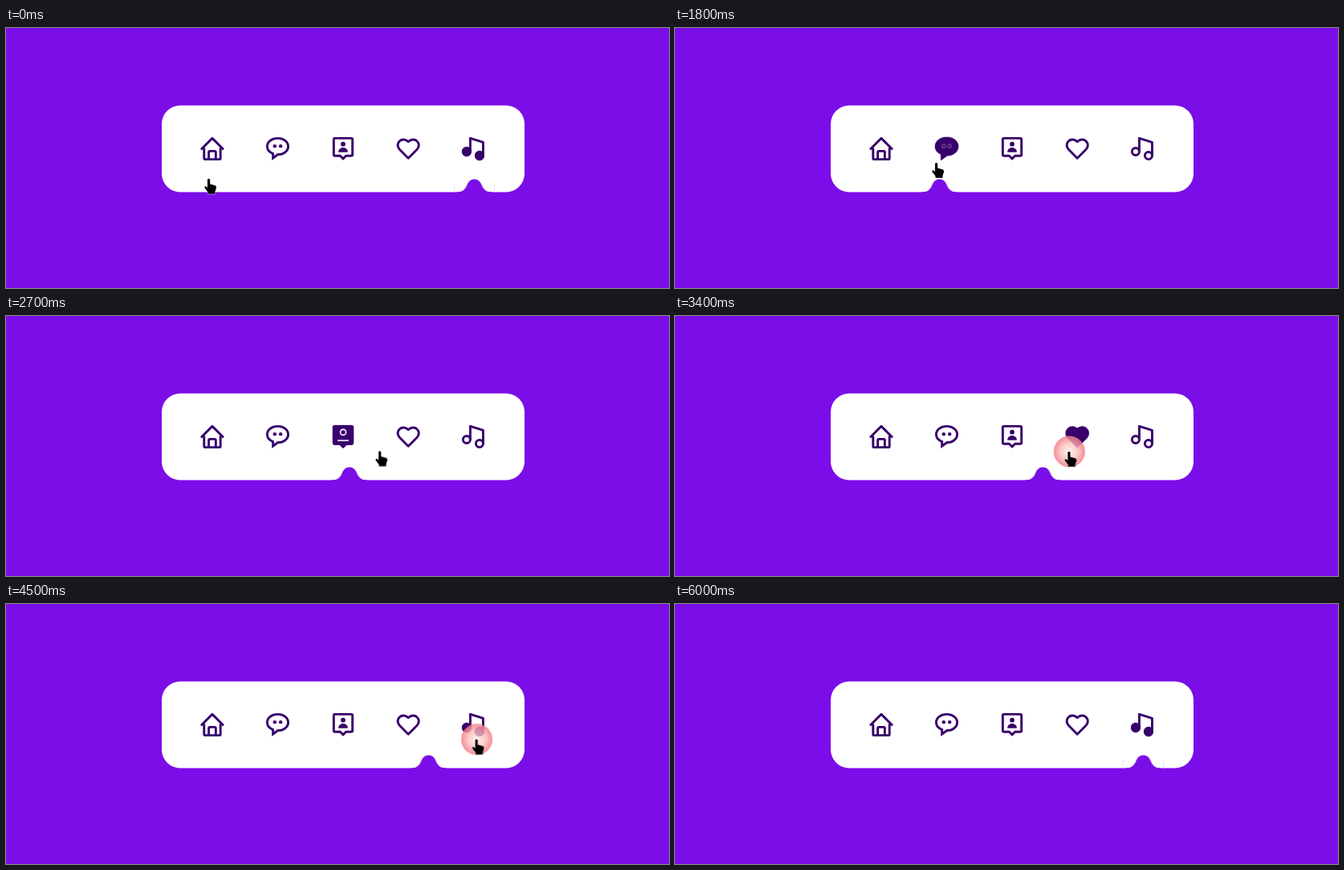
These frames come from a looping animation (826x324 px, 6100 ms). An HTML page without scripts:

```html
<!DOCTYPE html>
<html lang="en">
<head>
<meta charset="utf-8">
<title>Tab bar</title>
<style>
  :root { --bg: #7b0de8; --ink: #38006b; --loop: 6100ms; }
  html, body { margin: 0; width: 100%; height: 100%; overflow: hidden; background: var(--bg); }
  svg { display: block; width: 826px; height: 324px; }

  .icon { fill: none; stroke: var(--ink); stroke-width: 2; stroke-linecap: round; stroke-linejoin: round; }
  .sharp { stroke-linejoin: miter; }
  .solid { fill: var(--ink); }
  .dot { fill: var(--ink); stroke: none; }
  .cut { fill: #fff; stroke: none; }
  .line { fill: none; stroke: #fff; stroke-linecap: butt; }

  .on { opacity: 0; animation: var(--loop) step-end infinite; }
  .home { animation-name: home; }
  .chat { animation-name: chat; }
  .user { animation-name: user; }
  .heart { animation-name: heart; }
  .music { animation-name: music; }
  @keyframes home { 0%, 25.77% { opacity: 0 } 8.393% { opacity: 1 } }
  @keyframes chat { 0%, 38.934% { opacity: 0 } 25.77% { opacity: 1 } }
  @keyframes user { 0%, 52.656% { opacity: 0 } 38.934% { opacity: 1 } }
  @keyframes heart { 0%, 70.902% { opacity: 0 } 52.656% { opacity: 1 } }
  @keyframes music { 0%, 70.902% { opacity: 1 } 8.393% { opacity: 0 } }

  .notch { fill: var(--bg); animation: slide var(--loop) cubic-bezier(.68, -.55, .265, 1.55) infinite; }
  @keyframes slide {
    0%, 8.393% { transform: translateX(583.5px) }
    14.951%, 25.77% { transform: translateX(257.5px) }
    32.328%, 38.934% { transform: translateX(339px) }
    45.492%, 52.656% { transform: translateX(420.5px) }
    59.213%, 70.902% { transform: translateX(502px) }
    77.459%, 100% { transform: translateX(583.5px) }
  }

  .seams { stroke: #e9e6ee; animation: seams var(--loop) step-end infinite; }
  @keyframes seams { 0%, 80.33% { opacity: 1 } 8.197% { opacity: 0 } }

  .cursor { animation: move var(--loop) linear infinite; }
  @keyframes move {
    0% { transform: translate(253px, 188px) }
    3.279%, 14.754% { transform: translate(249px, 173px) }
    16.393% { transform: translate(268px, 171px) }
    18.033% { transform: translate(299px, 169px) }
    19.672% { transform: translate(318px, 168px) }
    21.311%, 31.148% { transform: translate(326px, 168px) }
    32.787% { transform: translate(365px, 168px) }
    34.426%, 40.984% { transform: translate(404px, 168px) }
    44.262% { transform: translate(466px, 168.5px) }
    47.541% { transform: translate(488px, 169px) }
    49.18%, 55.738% { transform: translate(491px, 169px) }
    60.656% { transform: translate(583.5px, 168px) }
    62.295%, 65.574% { transform: translate(585px, 168px) }
    67.213%, 73.77% { transform: translate(586.5px, 168.5px) }
    75.41% { transform: translate(588px, 190px) }
    78.689% { transform: translate(598px, 302px) }
    80.328%, 100% { transform: translate(600px, 350px) }
  }

  .press { opacity: 0; animation: press var(--loop) step-end infinite; }
  @keyframes press {
    0%, 11.67%, 29.05%, 42.21%, 55.93%, 74.18% { opacity: 0 }
    8.07%, 25.44%, 38.61%, 52.33%, 70.57% { opacity: 1 }
  }
  .hand { stroke: #fff; stroke-width: .8; paint-order: stroke; }
</style>
</head>
<body>
<svg viewBox="0 0 826 324">
  <defs>
    <radialGradient id="glow">
      <stop offset="0" stop-color="#fff0ea" stop-opacity=".75"/>
      <stop offset=".5" stop-color="#fbc0bd" stop-opacity=".78"/>
      <stop offset="1" stop-color="#f27884" stop-opacity=".85"/>
    </radialGradient>
    <path id="bubble" d="M12 3C7 3 3 6 3 10c0 2.6 1.8 4.9 5 6.2V20l4-3c5 0 9-3 9-7s-4-7-9-7z"/>
    <path id="pin" d="M5 3h14a1 1 0 0 1 1 1v13a1 1 0 0 1-1 1h-4.5L12 20.5 9.5 18H5a1 1 0 0 1-1-1V4a1 1 0 0 1 1-1z"/>
    <path id="love" d="M12 20L4.5 12.5C2.5 10.5 2.5 7.5 4.5 5.5S9.8 3.6 12 6c2.2-2.4 5.5-2.5 7.5-.5s2 5 0 7z"/>
    <g id="notes">
      <circle cx="6.1" cy="14.4" r="3.1"/>
      <circle cx="17.1" cy="17.9" r="3.1"/>
    </g>
  </defs>

  <rect width="826" height="324" fill="#7b0de8"/>
  <rect x="194" y="96.5" width="452" height="108" rx="23" fill="#fff"/>
  <path class="seams" d="M558.5 194v10.5M608.5 194v10.5"/>
  <path class="notch" d="M-22 206v-1.5C-14.5 204.5-11.8 201-9.5 196.5C-7.5 191-4.5 188.5 0 188.5S7.5 191 9.5 196.5C11.8 201 14.5 204.5 22 204.5v1.5z"/>

  <g class="icon" transform="translate(239.5 133) scale(1.458)">
    <path d="M3 12l9-9 9 9M5 12v8a1 1 0 0 0 1 1h12a1 1 0 0 0 1-1v-8M9 21v-6a1 1 0 0 1 1-1h4a1 1 0 0 1 1 1v6"/>
    <g class="on home">
      <path class="solid" d="M12 3l9 9h-2v8a1 1 0 0 1-1 1H6a1 1 0 0 1-1-1v-8H3z"/>
      <path class="cut" d="M10 16.4h4V20h-4z"/>
    </g>
  </g>

  <g class="icon sharp" transform="translate(321 133) scale(1.458)">
    <use href="#bubble"/>
    <g class="dot"><circle cx="9.5" cy="9.7" r="1.5"/><circle cx="14.5" cy="9.7" r="1.5"/></g>
    <g class="on chat">
      <use href="#bubble" class="solid"/>
      <g class="line" stroke-width=".45" stroke-opacity=".65"><circle cx="9.5" cy="9.7" r="1.5"/><circle cx="14.5" cy="9.7" r="1.5"/></g>
    </g>
  </g>

  <g class="icon" transform="translate(402.5 133) scale(1.458)">
    <use href="#pin"/>
    <circle class="dot" cx="12" cy="8" r="2"/>
    <path class="dot" d="M8 15v-.4c0-2 1.8-3.6 4-3.6s4 1.6 4 3.6v.4z"/>
    <g class="on user">
      <use href="#pin" class="solid"/>
      <g class="line" stroke-width="1.1"><circle cx="12" cy="8.1" r="2.4"/><path d="M7.3 15.2h9.4"/></g>
    </g>
  </g>

  <g class="icon" transform="translate(483.7 133) scale(1.458)">
    <use href="#love"/>
    <use href="#love" class="solid on heart"/>
  </g>

  <g class="icon" transform="translate(565 133) scale(1.458)">
    <path d="M9.2 14.4V3l11 3.5v11.4"/>
    <use href="#notes"/>
    <use href="#notes" class="solid on music"/>
  </g>

  <g class="cursor">
    <circle class="press" r="19.5" fill="url(#glow)"/>
    <path class="hand" d="M-2 1.2C-2-.4 1.2-.4 1.2 1.2V6.6L7.3 8.2C8.8 8.7 9.2 9.8 9 11.4L7.5 15.8V18.8H-1.5V16.5L-5.5 11.2C-6 9.6-4.6 8.8-3.4 9.8L-2 11.2z"/>
  </g>
</svg>
</body>
</html>
```
